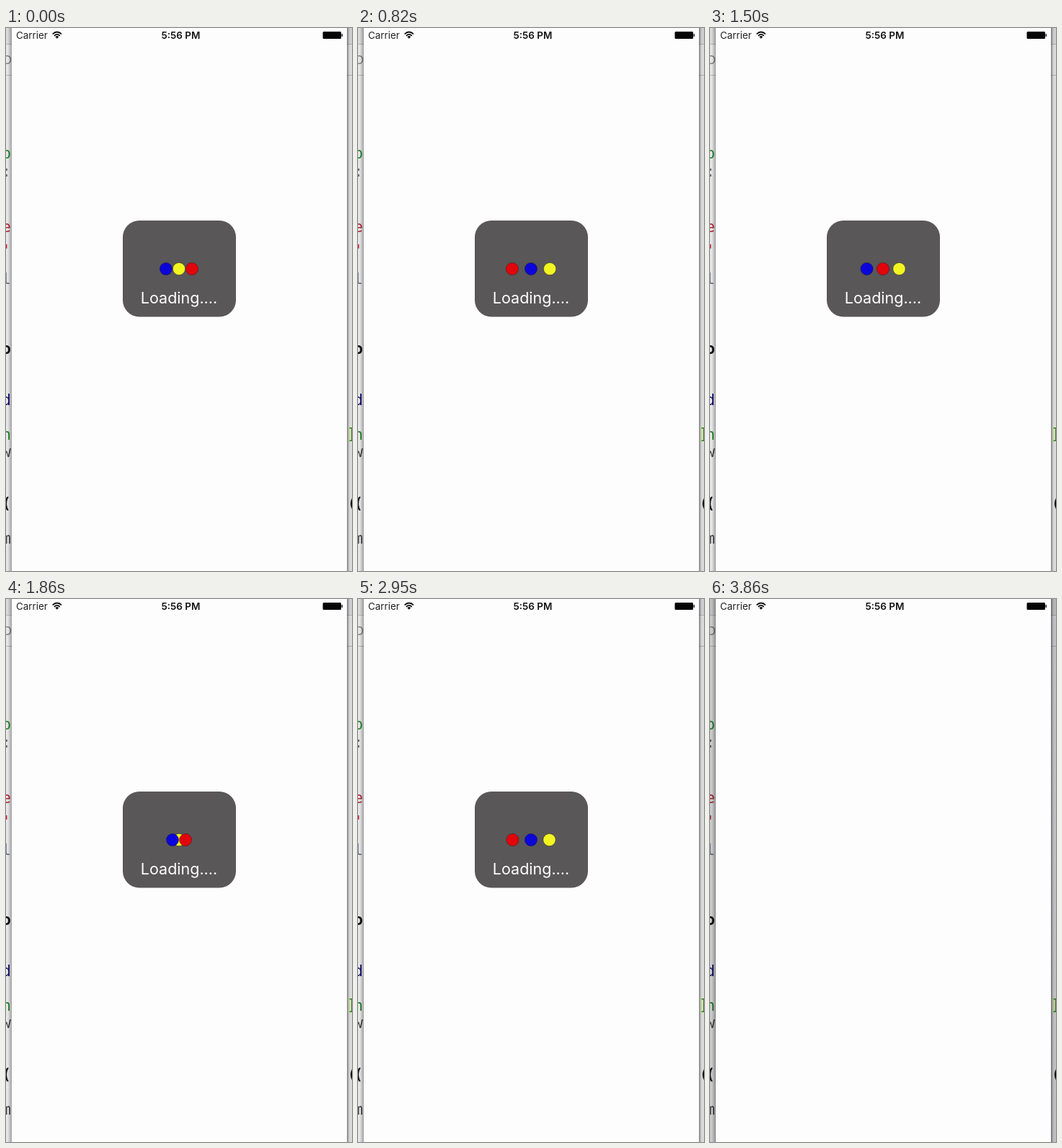
An HTML page that plays this animation: 480 by 753 pixels, repeating every 3900 ms.

```html
<!DOCTYPE html>
<html lang="en">
<head>
<meta charset="utf-8">
<title>Loading dots</title>
<style>
  html, body { margin: 0; width: 100%; height: 100%; overflow: hidden; background: #e6e5e7; }
  svg { display: block; width: 100%; height: 100%; }
  text { font-family: Inter, Roboto, sans-serif; }
  #code text { font: 21px "DejaVu Sans Mono", monospace; }
  #code .bold { font-weight: bold; }
</style>
</head>
<body>
<svg viewBox="0 0 480 753">
  <defs>
    <linearGradient id="leftShade">
      <stop offset="0.3" stop-color="#000" stop-opacity="0"/>
      <stop offset="1" stop-color="#000" stop-opacity=".3"/>
    </linearGradient>
    <linearGradient id="rightShade">
      <stop offset="0" stop-color="#000" stop-opacity=".55"/>
      <stop offset=".6" stop-color="#000" stop-opacity=".05"/>
    </linearGradient>
  </defs>

  <rect width="480" height="753" fill="#e6e5e7"/>
  <rect width="480" height="22" fill="#d9d8da"/>
  <path d="M0 22.5H480M0 65.5H480" stroke="#b5b4b6"/>
  <rect x="475" y="553" width="5" height="21" fill="#e9e6c4"/>
  <g id="code"></g>
  <rect id="dim" width="480" height="753" opacity=".12"/>
  <rect width="8" height="753" fill="url(#leftShade)"/>
  <rect x="472" width="8" height="753" fill="url(#rightShade)"/>

  <rect x="8" width="465" height="753" fill="#fefdfe"/>
  <text x="14" y="15" font-size="13.4" fill="#222">Carrier</text>
  <g fill="none" stroke="#111" stroke-width="1.8">
    <path d="M64.6 8.4Q70.8 2.6 77 8.4M66.8 10.8Q70.8 7 74.8 10.8"/>
    <path d="M68.4 12.2Q70.8 10 73.2 12.2L70.8 14.8Z" fill="#111" stroke="none"/>
  </g>
  <text x="242.5" y="15" font-size="13.5" font-weight="600" fill="#111" text-anchor="middle">5:56 PM</text>
  <rect x="439.5" y="5" width="25.5" height="10" rx="1.5" fill="#050505"/>
  <rect x="465.5" y="8" width="1.6" height="4" rx=".8" fill="#222"/>

  <g id="hud">
    <rect x="162" y="267" width="157" height="133.5" rx="23" fill="#5a5759"/>
    <text x="240" y="382" font-size="21.5" fill="#fff" text-anchor="middle">Loading....</text>
    <g id="dots" stroke="#000" stroke-opacity=".4" stroke-width=".8"></g>
  </g>
</svg>
<script>
const NS = "http://www.w3.org/2000/svg";
const $ = id => document.getElementById(id);

function add(parent, tag, attrs, text = "") {
  const el = document.createElementNS(NS, tag);
  for (const key in attrs) el.setAttribute(key, attrs[key]);
  el.textContent = text;
  return parent.appendChild(el);
}

// Editor glyphs peeking out at the left edge: [char, baseline, colour, class]
const GLYPHS = [
  ["p", 181, "#208a28"], [":", 206, "#666"], ["e", 283, "#b52632"],
  ["'", 316, "#b52632"], ["l", 355, "#61718c"], ["o", 452, "#111", "bold"],
  ["d", 523, "#15156e"], ["n", 571, "#208a28"], ["w", 595, "#444"],
  ["(", 666, "#111", "bold"], ["m", 715, "#444"]
];
for (const [char, y, fill, cls = ""] of GLYPHS)
  add($("code"), "text", { x: 7, y, fill, class: cls, "text-anchor": "end" }, char);
add($("code"), "text", { x: 8, y: 50, fill: "#777", style: "font:16px Inter,sans-serif", "text-anchor": "end" }, "D");
add($("code"), "text", { x: 473, y: 570, fill: "#208a28" }, "]");
add($("code"), "text", { x: 474, y: 666, fill: "#111", class: "bold" }, "(");

const LOOP = 3900, STEP = 45.4, HIDE_AT = 3590;
const CENTER = 240, REACH = 29;
const COLORS = { B: "#0c05d9", Y: "#f3f522", R: "#e1050b" };
// Left, middle and right colour for each spread of the dots
const ORDERS = ["BYR", "RBY", "BRY", "BYR", "RYB", "RBY", "YRB"];
// [time, phase]: the dots meet at whole phases and are widest at the halves
const PHASES = [[0, .289], [500, 1.068], [1090, 2.053], [1860, 3.188], [2360, 4.188], [2950, 5.387], [3600, 6.55]];

const dots = [0, 1, 2].map(() => add($("dots"), "circle", { cy: 334, r: 8.6 }));

function phaseAt(t) {
  const i = Math.max(1, PHASES.findIndex(([time]) => time >= t));
  const [t0, p0] = PHASES[i - 1], [t1, p1] = PHASES[i];
  return p0 + (p1 - p0) * (t - t0) / (t1 - t0);
}

function render(time) {
  const t = Math.round(Math.floor((time % LOOP + 5) / STEP) * STEP / 10) * 10;
  const visible = t < HIDE_AT;
  $("hud").style.display = visible ? "" : "none";
  $("dim").style.display = visible ? "none" : "";
  if (!visible) return;

  const phase = phaseAt(t), turn = Math.floor(phase);
  const spread = REACH * (1 - Math.cos(2 * Math.PI * phase)) / 2;
  // Slots from back to front; the front side alternates
  const slots = turn % 2 ? [1, 2, 0] : [1, 0, 2];
  slots.forEach((slot, i) => {
    dots[i].setAttribute("cx", CENTER + (slot - 1) * spread);
    dots[i].setAttribute("fill", COLORS[ORDERS[turn][slot]]);
  });
}

const start = performance.now();
function tick() {
  render(performance.now() - start);
  requestAnimationFrame(tick);
}
tick();
</script>
</body>
</html>
```
